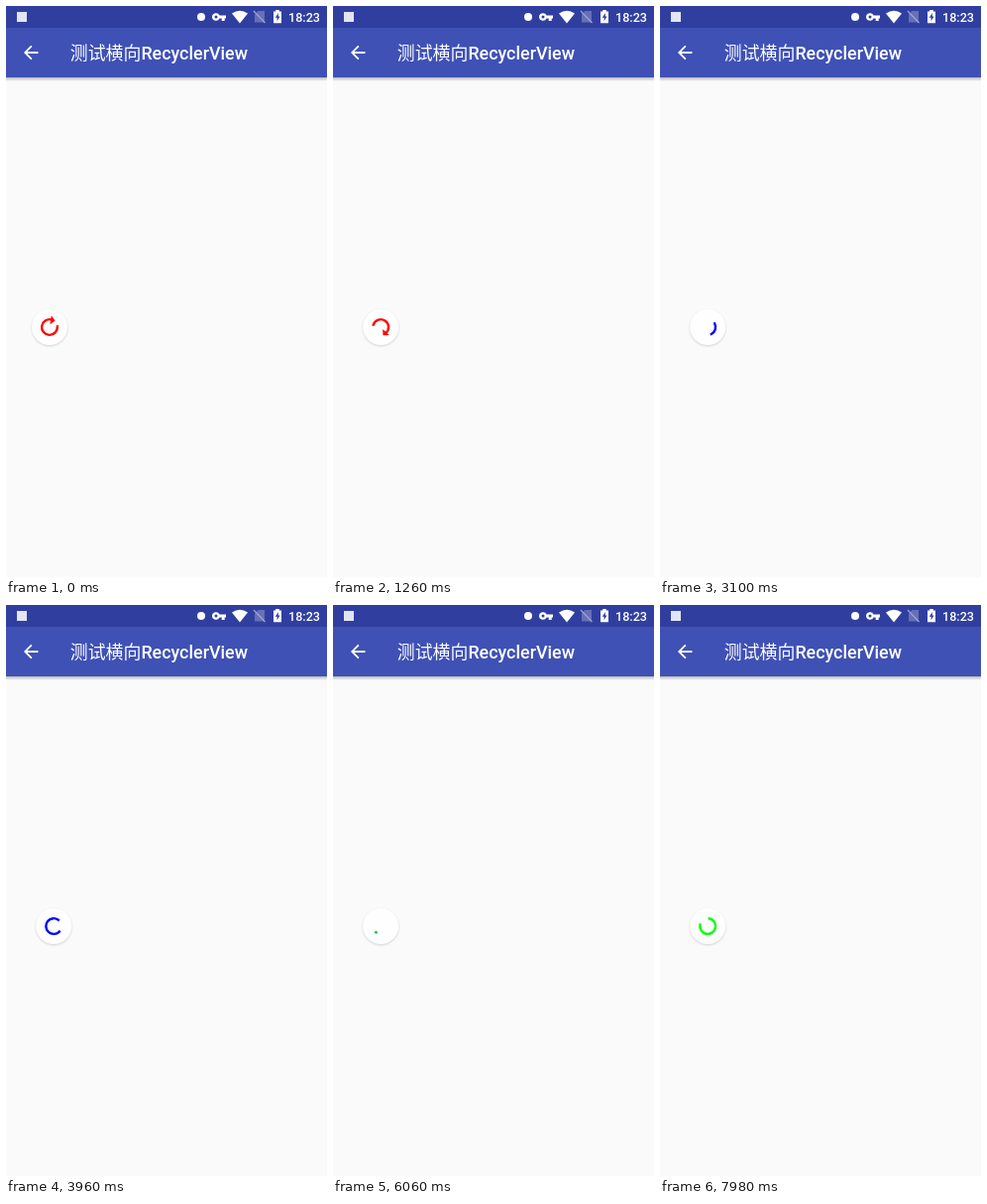
These frames come from a looping animation (324 by 576 pixels, 8000 ms). An HTML page:

```html
<!DOCTYPE html>
<html lang="zh">
<head>
<meta charset="utf-8">
<title>测试横向RecyclerView</title>
<style>
  html, body { margin: 0; width: 100%; height: 100%; overflow: hidden; background: #fafafa; }
  svg { display: block; width: 100%; height: 100%; }
  text { fill: #fff; font-family: Roboto, "Noto Sans CJK SC", "Noto Sans CJK", sans-serif; font-weight: 500; }
  .cjk { font-family: "Noto Sans CJK SC", "Noto Sans CJK", sans-serif; font-weight: 400; }
  #disc { filter: drop-shadow(0 1.2px 1.3px rgba(0, 0, 0, .16)); }
</style>
</head>
<body>
<svg viewBox="0 0 324 576">
  <defs>
    <linearGradient id="shade" x2="0" y2="1">
      <stop stop-color="#000" stop-opacity=".26"/>
      <stop offset="1" stop-color="#000" stop-opacity="0"/>
    </linearGradient>
  </defs>
  <rect width="324" height="576" fill="#fafafa"/>
  <rect y="72" width="324" height="4" fill="url(#shade)"/>
  <rect y="22" width="324" height="50" fill="#3f51b5"/>
  <rect width="324" height="22" fill="#303f9f"/>

  <!-- Status bar -->
  <g fill="#fff">
    <rect x="11" y="6" width="10" height="10" fill="#e2e5f2"/>
    <circle cx="197" cy="11" r="4"/>
    <path fill-rule="evenodd" d="M208 11a4 4 0 0 1 7.6-1.5H222v3h-1.300v2.600h-3v-2.600H215.600A4 4 0 0 1 208 11zM210.500 11a1.500 1.500 0 0 0 3 0a1.500 1.500 0 0 0-3 0z"/>
    <path d="M228 7.500Q236 2 244 7.500L236 17.500z"/>
    <path d="M254.500 5h6.500v11.500h-10V8.500z" fill="#6670b5"/>
    <path d="M250 5l11.500 12" stroke="#a0a6d2" stroke-width="1.200"/>
    <path d="M272.200 4h3.600v1.400h2.200v11.800h-8V5.400h2.200z"/>
    <path d="M274.800 7l-3 4.700h1.800v3.600l2.900-4.900h-1.700z" fill="#303f9f"/>
  </g>
  <text x="285" y="15.700" font-size="12.600">18:23</text>

  <!-- Toolbar -->
  <path transform="translate(14.400 36.200) scale(.9)" fill="#fff" d="M20 11H7.830l5.590-5.590L12 4l-8 8 8 8 1.410-1.410L7.830 13H20z"/>
  <text x="64.800" y="53.600" font-size="17.900"><tspan class="cjk">测试横向</tspan><tspan>RecyclerView</tspan></text>

  <!-- Refresh indicator -->
  <g id="spinner">
    <circle id="disc" r="18" fill="#fefefe"/>
    <path id="arc" fill="none" stroke-width="2.400" stroke-linecap="square"/>
    <path id="arrow" d="M2.810 0h9l-4.500 4.500z"/>
  </g>
</svg>
<script>
const LOOP = 8000, RADIUS = 7.875;
const PULL = 12, START = 15.5, FINISH = 40, CYCLE = 80;   // in ticks
const MAX_ARC = .8, MIN_ARC = .0455, REACH = MAX_ARC - MIN_ARC;
const COLORS = [[255, 0, 0], [0, 0, 255], [0, 255, 0]];
const [spinner, arc, arrow] = ['spinner', 'arc', 'arrow'].map(id => document.getElementById(id));

const clamp = v => Math.min(1, Math.max(0, v));
const mix = (a, b, t) => a + (b - a) * t;

// cubic-bezier(.4, 0, .2, 1)
function fastOutSlowIn(x) {
  let lo = 0, hi = 1;
  for (let i = 0; i < 24; i++) {
    const s = (lo + hi) / 2, r = 1 - s;
    if (1.2 * r * r * s + .6 * r * s * s + s ** 3 < x) lo = s; else hi = s;
  }
  return 3 * (1 - lo) * lo * lo + lo ** 3;
}

// Three ticks per 140 ms, spaced 20, 20 and 100 ms.
function tickAt(ms) {
  return 3 * Math.floor(ms / 140) + Math.min(2, Math.floor(ms % 140 / 20));
}

function colorAt(index, t) {
  const blend = clamp((t - .75) / .25);
  const from = COLORS[index % 3], to = COLORS[(index + 1) % 3];
  return `rgb(${from.map((c, i) => Math.round(mix(c, to[i], blend)))})`;
}

// Angles are in turns, clockwise from three o'clock.
function poseAt(tick) {
  const pull = 1 - (1 - clamp(tick / PULL)) ** 2;
  const x = mix(44, 48.2, pull);
  const spin = tick - START;
  if (spin < FINISH) {
    const t = clamp(spin / FINISH);
    const turn = mix(mix(-.012, .065, pull), 1, t);
    return { x, tail: REACH * t + turn, head: MAX_ARC + turn, color: colorAt(0, t), arrow: true };
  }
  const n = Math.floor((spin - FINISH) / CYCLE);
  const t = (spin - FINISH) / CYCLE - n;
  const base = MAX_ARC + REACH * n + (.25 + .6) * (n + t);
  return {
    x,
    tail: base + REACH * fastOutSlowIn(clamp(2 * t - 1)),
    head: base + REACH * fastOutSlowIn(clamp(2 * t)),
    color: colorAt(n + 1, t),
    arrow: false
  };
}

function point(turn) {
  const a = turn * 2 * Math.PI;
  return `${(RADIUS * Math.cos(a)).toFixed(3)} ${(RADIUS * Math.sin(a)).toFixed(3)}`;
}

function draw(ms) {
  const p = poseAt(tickAt(ms));
  const head = Math.max(p.head, p.tail + .002);
  spinner.setAttribute('transform', `translate(${p.x} 324)`);
  arc.setAttribute('d', `M${point(p.tail)}A${RADIUS} ${RADIUS} 0 ${+(head - p.tail > .5)} 1 ${point(head)}`);
  arc.setAttribute('stroke', p.color);
  arrow.setAttribute('fill', p.color);
  arrow.setAttribute('transform', `rotate(${p.head * 360 - 5})`);
  arrow.setAttribute('visibility', p.arrow ? 'visible' : 'hidden');
}

const begin = performance.now();
function loop() {
  draw((performance.now() - begin) % LOOP);
  requestAnimationFrame(loop);
}
loop();
</script>
</body>
</html>
```
